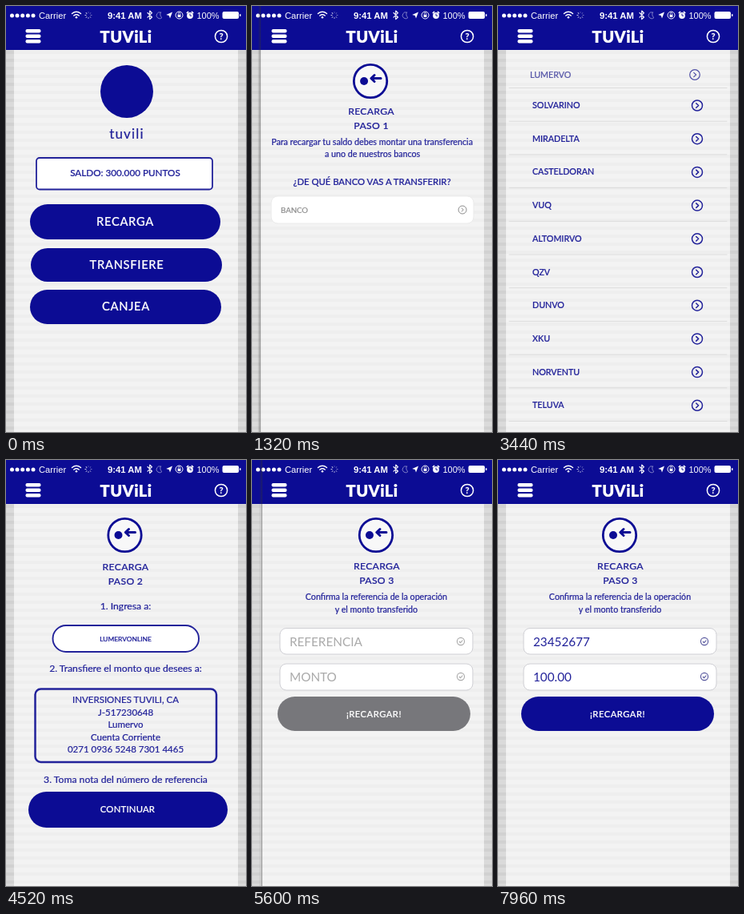
Animation of 300 by 533 pixels, one loop 8000 ms. Source, as an HTML page:

```html
<!DOCTYPE html>
<html lang="es">
<head>
<meta charset="utf-8">
<title>Recarga</title>
<style>
  html, body { margin: 0; width: 100%; height: 100%; overflow: hidden; background: #f1f1f1; }
  svg { display: block; width: 100vw; height: 100vh; font-family: Lato, "Open Sans", sans-serif; }
  text { fill: currentColor; stroke: currentColor; }
  .status { font-family: "Liberation Sans", Arial, sans-serif; }
</style>
</head>
<body>
<svg id="stage" viewBox="0 0 300 533"></svg>
<script>
const LOOP = 8000, SLIDE = 500, LEFT = 10, RIGHT = 290, TOP = 55;
const BLUE = '#0c0c94', INK = '#22229a', GREY = '#8c8c8c';
const BRAND = 'TUViLi', BANK = 'Lumervo';

// A hairline outline gives the small type its sturdier weight.
const text = (x, y, size, str, { fill = INK, anchor = 'middle', weight = 400, gap = 0, edge = .22, id = '' } = {}) =>
  `<text id="${id}" x="${x}" y="${y}" font-size="${size}" color="${fill}" text-anchor="${anchor}"
    font-weight="${weight}" letter-spacing="${gap}" stroke-width="${edge}">${str}</text>`;
const box = (x1, y1, x2, y2, r, fill, stroke = 'none', width = 1, id = '') =>
  `<rect id="${id}" x="${x1}" y="${y1}" width="${x2 - x1}" height="${y2 - y1}" rx="${r}"
    fill="${fill}" stroke="${stroke}" stroke-width="${width}"/>`;
const disc = (x, y, r, fill, stroke = 'none', width = 1) =>
  `<circle cx="${x}" cy="${y}" r="${r}" fill="${fill}" stroke="${stroke}" stroke-width="${width}"/>`;
const line = (d, stroke, width = 1) =>
  `<path d="${d}" fill="none" stroke="${stroke}" stroke-width="${width}" stroke-linecap="round" stroke-linejoin="round"/>`;

const chevron = (x, y, r, color, width) => disc(x, y, r, 'none', color, width) +
  line(`M${x - r * .2} ${y - r * .42}l${r * .45} ${r * .42}l${-r * .45} ${r * .42}`, color, width);
const tick = (x, y, id) => `<g id="${id}" stroke="${GREY}" fill="none" stroke-width="1.1">
  <circle cx="${x}" cy="${y}" r="4.6"/><path d="M${x - 2} ${y}l1.6 1.7l2.8-3.2"/></g>`;
const button = (x1, y1, x2, y2, label, textX, baseline, size, gap, id) =>
  box(x1, y1, x2, y2, (y2 - y1) / 2, BLUE, 'none', 0, id) +
  text(textX, baseline, size, label, { fill: '#fff', gap, weight: 500 });

const stepHeading = (x, step, y) =>
  disc(x, 94, 20.7, '#f8f8f8', BLUE, 2.8) + disc(x - 8, 94, 5, BLUE) +
  line(`M${x + 13} 90.5H${x + 2}M${x + 5} 86.5l-4.2 4l4.2 4`, BLUE, 3) +
  text(x + 1, y, 12.2, 'RECARGA', { gap: .3, weight: 500 }) +
  text(x + 1, y + 18, 12.2, 'PASO ' + step, { gap: .3, weight: 500 });

const homePage = () => disc(151, 107, 33, BLUE) +
  text(151, 166, 17, BRAND.toLowerCase(), { gap: 1.2 }) +
  box(38, 190, 258, 229.5, 4, '#fff', INK, 1.8) +
  text(149, 213, 11.7, 'SALDO: 300.000 PUNTOS', { weight: 500 }) +
  button(30, 248, 268, 292, 'RECARGA', 149, 274.5, 14.7, .7) +
  button(31, 303, 270, 345, 'TRANSFIERE', 151, 328.5, 14.7, .7) +
  button(30, 355, 269, 398, 'CANJEA', 150, 381, 14.7, .7);

const bankPage = () => stepHeading(147, 1, 136) +
  text(149, 174, 10.7, 'Para recargar tu saldo debes montar una transferencia') +
  text(149.5, 189, 10.7, 'a uno de nuestros bancos') +
  text(149, 224, 11.3, '¿DE QUÉ BANCO VAS A TRANSFERIR?', { weight: 500 }) +
  box(23, 238, 276, 272, 8, '#fff', '#ebebeb') +
  text(35, 259, 9.6, 'BANCO', { fill: GREY, anchor: 'start' }) +
  chevron(262, 255, 5, GREY, 1);

const listPage = () => ['SOLVARINO', 'MIRADELTA', 'CASTELDORAN', 'VUQ', 'ALTOMIRVO',
  'QZV', 'DUNVO', 'XKU', 'NORVENTU', 'TELUVA'].map((name, i) => {
    const y = 124.5 + i * 41.7;
    return line(`M14 ${y - 22}H286`, '#dcdcdc') +
      text(43, y + 3.5, 10.7, name, { anchor: 'start', weight: 500 }) +
      chevron(249, y, 6.5, INK, 1.5);
  }).join('') + line('M14 519.5H286', '#dcdcdc') +
  text(40, 89.5, 10.7, BANK.toUpperCase(), { anchor: 'start', fill: '#5656a8' }) +
  chevron(246, 86, 6.3, '#5050a6', 1.2);

const transferPage = () => stepHeading(148.5, 2, 137.5) +
  text(149.5, 186.5, 12.2, '1. Ingresa a:') +
  box(58.5, 207, 241, 240, 16.5, '#fff', INK, 1.9) +
  text(149.5, 226.5, 8.4, BANK.toUpperCase() + 'NLINE', { weight: 500 }) +
  text(149.5, 264.5, 12.2, '2. Transfiere el monto que desees a:') +
  box(36.5, 286.5, 263, 378, 7, 'none', INK, 2.5) +
  [`INVERSIONES ${BRAND.toUpperCase()}, CA`, 'J-517230648', BANK, 'Cuenta Corriente', '0271 0936 5248 7301 4465']
    .map((row, i) => text(149.5, 304 + i * 15.6, 11.5, row)).join('') +
  text(149.5, 403.5, 12.2, '3. Toma nota del número de referencia') +
  button(28, 415, 277, 460, 'CONTINUAR', 152, 441, 11.3, .2);

const confirmPage = () => stepHeading(152, 3, 137) +
  text(152.5, 175, 10.7, 'Confirma la referencia de la operación') +
  text(152.5, 191, 10.7, 'y el monto transferido') +
  box(32, 210.5, 273, 243, 8, '#fff', '#cfcfd4') +
  text(44, 232.5, 15.3, '', { anchor: 'start', edge: 0, id: 'reference' }) +
  box(32, 255, 273, 288, 8, '#fff', '#cfcfd4') +
  text(44, 277, 15.3, '', { anchor: 'start', edge: 0, id: 'amount' }) +
  tick(258, 227, 'referenceTick') + tick(258, 271, 'amountTick') +
  button(29, 296, 270, 339, '¡RECARGAR!', 149.5, 321.5, 11.2, .5, 'submit');

const statusBar = () => {
  const white = { fill: '#fff', anchor: 'start', edge: 0 };
  const dots = [7.5, 14, 20.7, 27.4, 34].map(x => disc(x, 12, 2.5, '#fff')).join('');
  const wifi = line('M82.5 9.5Q88 5 93.5 9.5M84.8 12Q88 9.4 91.2 12', '#fff', 1.5) + disc(88, 14.3, 1.3, '#fff');
  const spinner = Array.from({ length: 8 }, (_, i) =>
    `<path d="M103 9V7" stroke="#fff" stroke-opacity="${.25 + i * .09}" transform="rotate(${i * 45} 103 11.5)"/>`).join('');
  return '<g class="status">' + dots + text(41, 15.5, 11.2, 'Carrier', white) + wifi + spinner +
    text(127, 15.5, 11.3, '9:41 AM', { ...white, weight: 700 }) +
    line('M177 8.5l5.5 5.5l-2.8 2.7V6l2.8 2.6l-5.5 5.5', '#fff', 1.1) +
    line('M193.5 8A4 4 0 1 0 195 14.5A4.6 4.6 0 0 1 193.5 8', '#8080c8', 1) +
    '<path d="M208 7.5l-3 8l-1.2-3.6l-3.6-1z" fill="#fff"/>' +
    disc(216.5, 11.5, 4.5, 'none', '#fff', 1) + box(214.6, 11, 218.4, 14, .5, '#fff') +
    line('M215.3 11V9.5a1.2 1.2 0 0 1 2.4 0V11', '#fff', .8) +
    disc(230, 12, 3.9, '#fff') + line('M226.2 8.6l1.5-1.4M233.8 8.6l-1.5-1.4', '#fff', 1.5) +
    line('M230 9.8V12.2H231.8', BLUE, .9) +
    text(238.5, 15.5, 11, '100%', white) +
    box(270.5, 7, 291, 16, 2, '#fff') + box(292, 10, 293.5, 13, .7, '#fff') + '</g>';
};

const header = () => box(0, 0, 300, TOP, 0, BLUE) + statusBar() +
  [29, 35.5, 42].map(y => box(24.5, y, 43.5, y + 4.6, 2, '#fff')).join('') +
  text(150, 45.5, 20, BRAND, { fill: '#fff', weight: 900, gap: .4 }) +
  disc(269, 38, 7.6, 'none', '#fff', 1.5) + text(269, 42, 11, '?', { fill: '#fff', weight: 700 });

const stripes = (id, base, band) => `<pattern id="${id}" width="10" height="10" patternUnits="userSpaceOnUse">
  <path d="M0 0H10V10H0z" fill="${base}"/><path d="M0 6H10V10H0z" fill="${band}"/></pattern>`;

// Each page slides in from the right over the previous one.
const pages = [
  { draw: homePage, start: -SLIDE },
  { draw: bankPage, start: 870 },
  { draw: listPage, start: 2640 },
  { draw: transferPage, start: 3640 },
  { draw: confirmPage, start: 5170 }
];
const byId = id => document.getElementById(id);

byId('stage').innerHTML = `<defs>${stripes('paper', '#f3f3f3', '#eeeeee')}${stripes('margin', '#dadada', '#d1d1d1')}
    <linearGradient id="shade"><stop stop-color="#333" stop-opacity="0"/><stop offset="1" stop-color="#333" stop-opacity=".45"/></linearGradient>
  </defs>` + box(0, TOP, 300, 533, 0, 'url(#margin)') +
  pages.map((page, i) =>
    `<g id="page${i}">${box(LEFT, TOP, RIGHT, 533, 0, 'url(#paper)')}${page.draw()}</g>`).join('') +
  box(RIGHT, TOP, 300, 533, 0, 'url(#margin)') + header() +
  box(LEFT - 4, 0, LEFT, 533, 0, 'url(#shade)', 'none', 0, 'shadow');

const easeInOut = p => p < .5 ? 4 * p ** 3 : 1 - 4 * (1 - p) ** 3;

function typeInto(id, value, placeholder, elapsed) {
  const typed = value.slice(0, Math.max(0, Math.floor(elapsed / 100)));
  byId(id).textContent = typed || placeholder;
  byId(id).setAttribute('color', typed ? INK : '#aaa');
  byId(id + 'Tick').setAttribute('stroke', typed ? '#55559c' : '#aaa');
  return typed === value;
}

function render(t) {
  byId('shadow').setAttribute('visibility', 'hidden');
  pages.forEach((page, i) => {
    const progress = Math.min(1, Math.max(0, (t - page.start) / SLIDE));
    const shift = `translate(${(RIGHT - LEFT) * (1 - easeInOut(progress))} 0)`;
    byId('page' + i).setAttribute('transform', shift);
    byId('page' + i).setAttribute('visibility', progress > 0 ? 'visible' : 'hidden');
    if (progress > 0 && progress < 1) {
      byId('shadow').setAttribute('transform', shift);
      byId('shadow').setAttribute('visibility', 'visible');
    }
  });
  typeInto('reference', '23452677', 'REFERENCIA', t - 5880);
  const complete = typeInto('amount', '100.00', 'MONTO', t - 6880);
  byId('submit').setAttribute('fill', complete ? BLUE : '#77777b');
}

function animate() {
  render(performance.now() % LOOP);
  requestAnimationFrame(animate);
}
animate();
</script>
</body>
</html>
```
